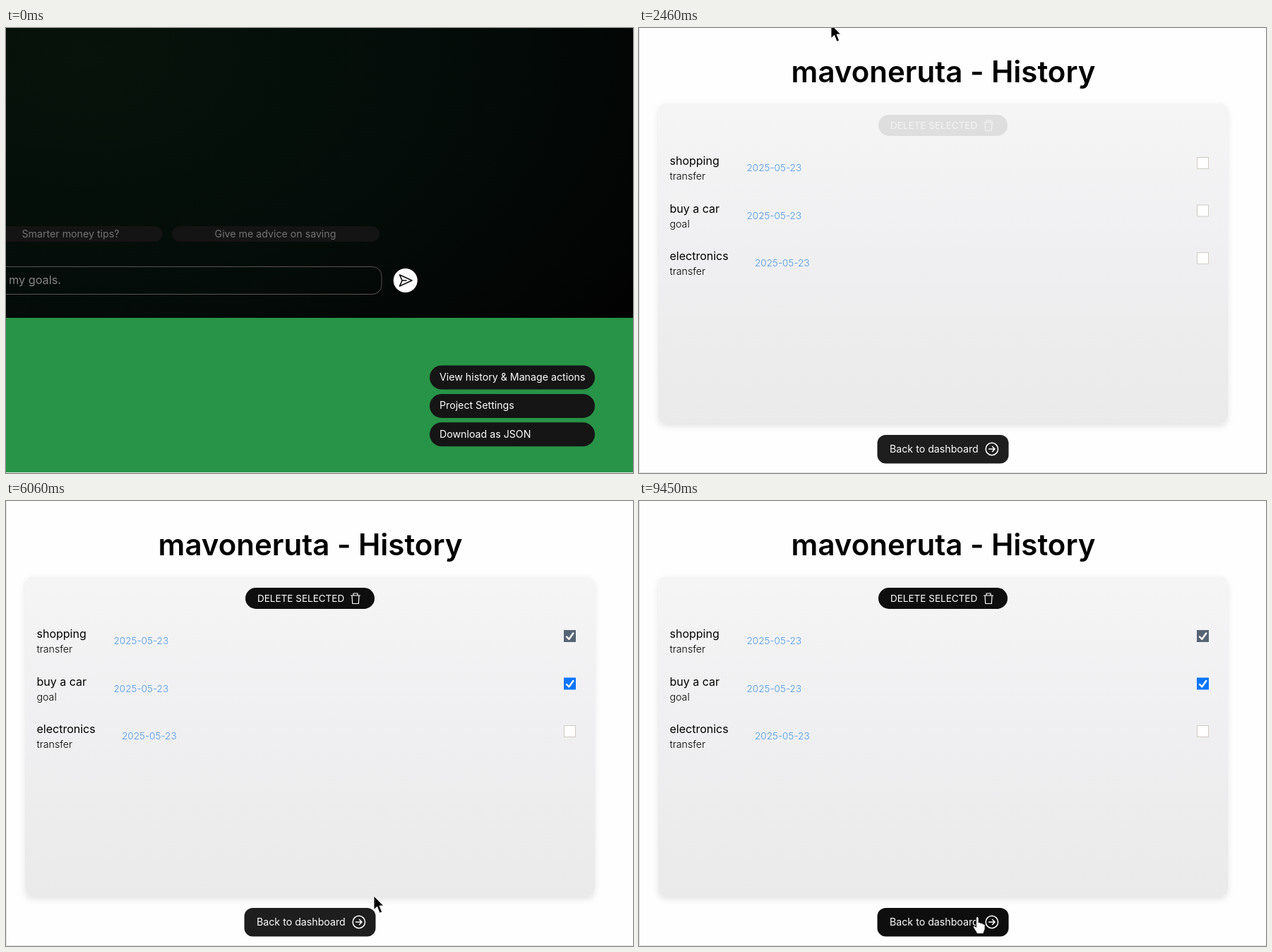
An HTML page for the animation above (9720 ms loop, 888 px wide and 631 px high).

```html
<!DOCTYPE html>
<html lang="en">
<head>
<meta charset="utf-8">
<title>History and actions</title>
<style>
  html, body { margin: 0; width: 100%; height: 100%; overflow: hidden; background: #fefefe; }
  svg { display: block; width: 888px; height: 631px; font: 14.2px Inter, sans-serif; }
  .icon { fill: none; stroke-linecap: round; stroke-linejoin: round; }
  .light { font-weight: 300; }
</style>
</head>
<body>
<svg viewBox="0 0 888 631">
  <defs>
    <radialGradient id="night" gradientUnits="userSpaceOnUse" r="950"
                    cx="0" cy="0" gradientTransform="translate(110 40) scale(1 .65)">
      <stop offset="0" stop-color="#07130b"/>
      <stop offset=".5" stop-color="#040d09"/>
      <stop offset="1" stop-color="#020202"/>
    </radialGradient>
    <linearGradient id="paper" x2="0" y2="1">
      <stop offset="0" stop-color="#f5f5f6"/>
      <stop offset=".5" stop-color="#efeff1"/>
      <stop offset="1" stop-color="#eaeaea"/>
    </linearGradient>
    <filter id="shadow" x="-5%" y="-5%" width="110%" height="112%">
      <feDropShadow dx="0" dy="4" stdDeviation="4" flood-opacity=".1"/>
    </filter>
  </defs>

  <g id="dashboard">
    <rect width="888" height="412" fill="url(#night)"/>
    <g fill="#141414">
      <rect x="-60" y="281" width="281.5" height="22" rx="11"/>
      <rect x="235" y="281" width="294" height="22" rx="11"/>
    </g>
    <g fill="#737373" text-anchor="middle">
      <text x="91.5" y="297">Smarter money tips?</text>
      <text x="381.5" y="297">Give me advice on saving</text>
    </g>
    <rect x="-60" y="338.5" width="592" height="39" rx="13" fill="none" stroke="#555"/>
    <text x="78" y="363" font-size="16.3" fill="#858585" text-anchor="end">reaching my goals.</text>
    <circle cx="565.7" cy="358" r="17" fill="#fff"/>
    <path class="icon" d="M557.5 350L575 358 557.5 366 561 358ZM561 358H567" stroke="#111" stroke-width="1.7"/>
    <rect y="411" width="888" height="219" fill="#279447"/>
    <rect y="630" width="888" height="1" fill="#e4e4e4"/>
    <g id="menu"></g>
  </g>

  <g id="history">
    <rect width="888" height="631" fill="#fefefe"/>
    <path d="M.5 0V630.5H888" fill="none" stroke="#dedede"/>
    <text x="431" y="76.5" font-size="42" font-weight="600" text-anchor="middle">mavoneruta - History</text>
    <rect x="27" y="106.5" width="807" height="454.5" rx="12" fill="url(#paper)" filter="url(#shadow)"/>
    <rect id="deleteButton" x="339" y="123" width="183" height="30" rx="15"/>
    <g id="deleteLabel">
      <text x="356" y="143" font-size="13.5">DELETE SELECTED</text>
      <path class="icon" d="M488.5 134H501.5M492 134V131H498V134M490 134L490.7 145.5H499.3L500 134" stroke-width="1.2"/>
    </g>
    <g id="rows"></g>
    <rect id="backButton" x="337.5" y="577" width="186" height="40.5" rx="12"/>
    <text x="355" y="601.5" fill="#fff">Back to dashboard</text>
    <g class="icon" stroke="#fff" stroke-width="1.5">
      <path d="M495.5 597H504M500.5 593.5L504 597 500.5 600.5"/>
      <circle cx="499.8" cy="597" r="8.7"/>
    </g>
  </g>

  <g id="cursor">
    <path id="arrow" d="M0 0V19.5L4.6 15.3 8.2 24.3 11.6 22.8 8 14H13.7Z" stroke="#fff" stroke-width=".9"/>
    <path id="hand" transform="translate(-6 0)" fill="#fff" stroke="#111" stroke-width=".8"
          d="M4.5 2Q6.3-1 8 2V9Q10 8 11 9.8 13 9 14 10.8 16.5 10.5 17 12.5V18L14.5 24.5H6L.5 15.5Q.5 12.5 3 14L4.5 15.5Z"/>
  </g>
</svg>
<script>
const LOOP = 9720, STEP = 70;
const OPEN_HISTORY = 2460, FIRST_CHECK = 4630, SECOND_CHECK = 5100;
const $ = id => document.getElementById(id);

// The pointer travels between these places: start, end, x, y.
const moves = [
  [70, 620, 741, 494],
  [1280, 2040, 220, -40],
  [2180, 2460, 272, -5],
  [2530, 3090, 159, 313],
  [3160, 4000, 691, 166],
  [4070, 4490, 806, 198],
  [4630, 5170, 798, 254],
  [5370, 6060, 521, 560],
  [6130, 6340, 321, 207],
  [6410, 6960, 411, 129],
  [7680, 7750, 419, 130],
  [7950, 8160, 488, 537],
  [8230, 8500, 467, 574],
  [8850, 8920, 481, 570],
  [9310, 9450, 479, 589]
];

const menu = ['View history &amp; Manage actions', 'Project Settings', 'Download as JSON']
  .map((label, i) => ({ label, y: 478.5 + i * 40.4 }));
$('menu').innerHTML = menu.map(({ label, y }) => `
  <rect x="600" y="${y}" width="234" height="34" rx="17"/>
  <text x="614" y="${y + 21.5}" fill="#fff">${label}</text>`).join('');
const menuRects = $('menu').querySelectorAll('rect');

const rows = [['shopping', 'transfer', 152.5], ['buy a car', 'goal', 152.5], ['electronics', 'transfer', 164]];
$('rows').innerHTML = rows.map(([name, kind, dateX], i) => `
  <g transform="translate(0 ${i * 67.5})">
    <text x="43.5" y="194" font-size="16">${name}</text>
    <text class="light" x="43.5" y="215">${kind}</text>
    <text class="light" x="${dateX}" y="203" font-size="13.6" fill="#4a9ae8">2025-05-23</text>
    <rect class="box" x="790.5" y="183.5" width="16" height="16"/>
    <path class="tick icon" d="M794 192.5L797.3 196 803.3 187.5" stroke="#fff" stroke-width="2.4"/>
  </g>`).join('');
const boxes = document.querySelectorAll('.box'), ticks = document.querySelectorAll('.tick');

const show = (node, on) => node.setAttribute('display', on ? 'inline' : 'none');
const paint = (node, fill, stroke = 'none') => {
  node.setAttribute('fill', fill);
  node.setAttribute('stroke', stroke);
};
const mix = (a, b, p) => a + (b - a) * p;
const clamp = p => Math.min(1, Math.max(0, p));
const ease = p => p * p * (3 - 2 * p);
const grey = v => `rgb(${v},${v},${v})`;

function pointerAt(time) {
  let x = 755, y = 645;
  for (const [start, end, toX, toY] of moves) {
    if (time < start) break;
    const count = Math.round((end - start) / STEP) + 1;
    const done = Math.floor((time - start) / STEP + 0.15) + 1;
    const p = ease(clamp(done / count));
    x = mix(x, toX, p);
    y = mix(y, toY, p);
  }
  return [x, y];
}

function render(time) {
  const [x, y] = pointerAt(time);
  const inside = (left, top, right, bottom) => x >= left && x <= right && y >= top && y <= bottom;
  const onHistory = time >= OPEN_HISTORY;
  show($('dashboard'), !onHistory);
  show($('history'), onHistory);

  const hovered = onHistory ? -1 : menu.findIndex(item => inside(600, item.y, 834, item.y + 34));
  menuRects.forEach((rect, i) => paint(rect, i === hovered ? '#0a0a0a' : '#151515'));

  const enabled = clamp((time - FIRST_CHECK + STEP) / 210);
  const label = grey(mix(244, 255, enabled));
  paint($('deleteButton'), grey(mix(222, 14, enabled)));
  paint($('deleteLabel'), label);
  $('deleteLabel').lastElementChild.setAttribute('stroke', label);

  const checked = [time >= FIRST_CHECK, time >= SECOND_CHECK, false];
  const colors = ['#566473', '#0a75ff'];
  boxes.forEach((box, i) => {
    paint(box, checked[i] ? colors[i] : '#fff', checked[i] ? colors[i] : '#cfcbc2');
    show(ticks[i], checked[i]);
  });

  const onBack = onHistory && inside(337, 568, 523, 617);
  const onDelete = enabled === 1 && inside(339, 123, 522, 153);
  paint($('backButton'), onBack ? '#0e0e0e' : '#1e1e1e');

  const pointing = hovered >= 0 || onBack || onDelete;
  show($('hand'), pointing);
  show($('arrow'), !pointing);
  $('cursor').setAttribute('transform', `translate(${Math.round(x)} ${Math.round(y)})`);
}

const begin = performance.now();
function tick() {
  render((performance.now() - begin) % LOOP);
  requestAnimationFrame(tick);
}
tick();
</script>
</body>
</html>
```
